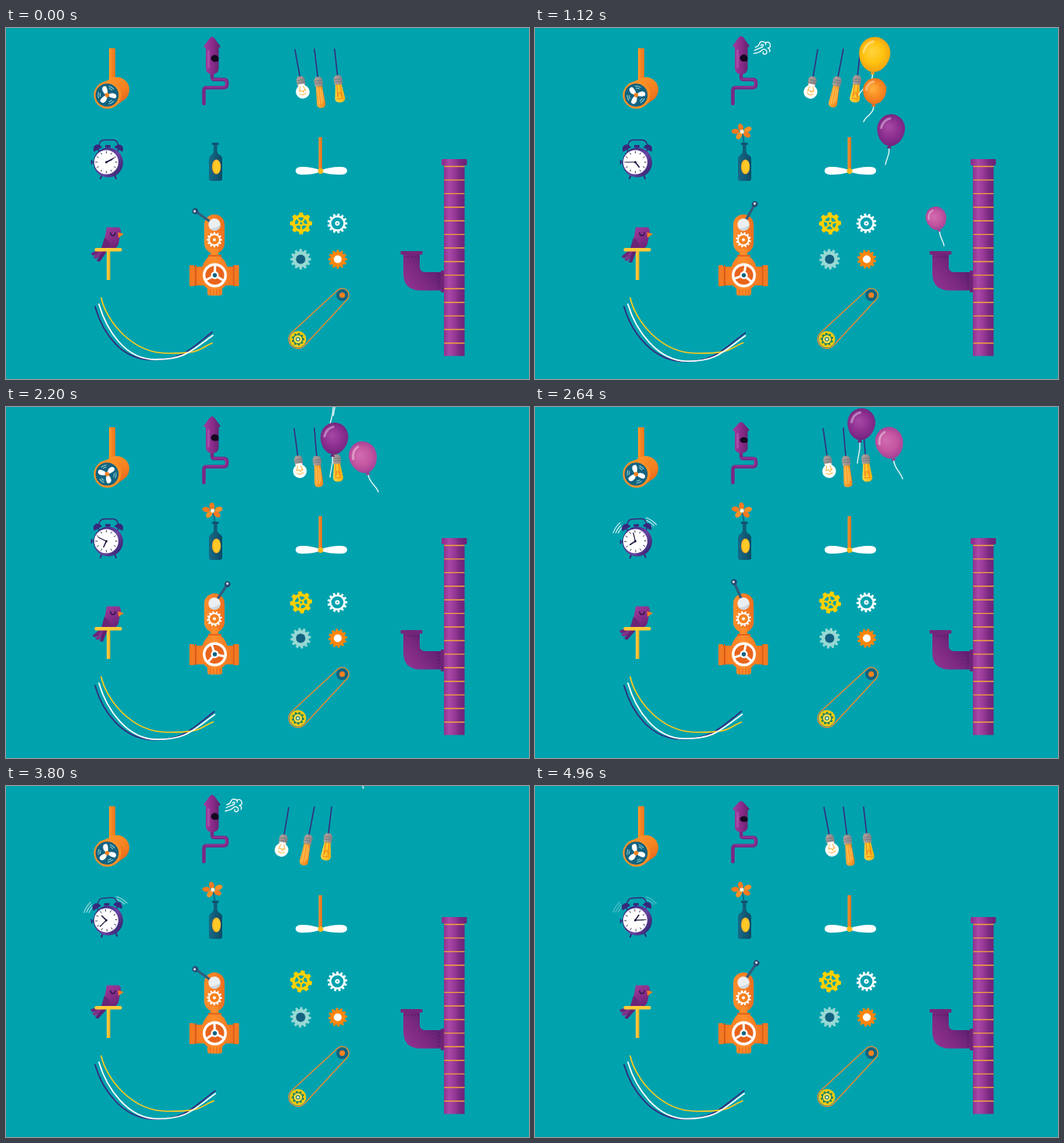
Animation, 670 px wide and 450 px high, one loop 5000 ms. Source, as an HTML page with a canvas:

```html
<!DOCTYPE html>
<html lang="en">
<head>
<meta charset="utf-8">
<title>Little machines</title>
<style>
html, body { margin: 0; width: 100%; height: 100%; overflow: hidden; background: #00a2ae; }
canvas { display: block; }
</style>
</head>
<body>
<canvas id="stage" width="670" height="450"></canvas>
<script>
const ctx = document.getElementById('stage').getContext('2d');
const LOOP = 5000, TAU = Math.PI * 2, DEG = Math.PI / 180;
const C = {
  bg: '#00a2ae', orange: '#f58220', deep: '#e8641b', yellow: '#ffcb0b', navy: '#37297c',
  purple: '#8b2c8c', teal: '#126381', pale: '#97d8d3', ink: '#20163f', white: '#fff'
};

// Drawing helpers
function fill(color, build) {
  ctx.beginPath(); build(); ctx.fillStyle = color; ctx.fill();
}
function stroke(color, width, build) {
  ctx.beginPath(); build();
  ctx.strokeStyle = color; ctx.lineWidth = width;
  ctx.lineCap = ctx.lineJoin = 'round'; ctx.stroke();
}
const disc = (x, y, r, color) => fill(color, () => ctx.arc(x, y, r, 0, TAU));
const oval = (x, y, rx, ry, color, a = 0) => fill(color, () => ctx.ellipse(x, y, rx, ry, a, 0, TAU));
const box = (x, y, w, h, color, r = 0) => fill(color, () => ctx.roundRect(x, y, w, h, r));
const ring = (x, y, r, w, color) => stroke(color, w, () => ctx.arc(x, y, r, 0, TAU));
const poly = (color, ...p) => fill(color, () => p.forEach(q => ctx.lineTo(...q)));
const line = (color, w, ...p) => stroke(color, w, () => p.forEach(q => ctx.lineTo(...q)));
const shape = (color, d) => { ctx.fillStyle = color; ctx.fill(new Path2D(d)); };
function trace(color, w, d) {
  ctx.strokeStyle = color; ctx.lineWidth = w; ctx.lineCap = 'round'; ctx.lineJoin = 'round';
  ctx.stroke(new Path2D(d));
}
function shade(x0, y0, x1, y1, ...colors) {
  const g = ctx.createLinearGradient(x0, y0, x1, y1);
  colors.forEach((c, i) => g.addColorStop(i / (colors.length - 1), c));
  return g;
}
function at(x, y, angle, draw, sx = 1, sy = sx) {
  ctx.save(); ctx.translate(x, y); ctx.rotate(angle); ctx.scale(sx, sy); draw(); ctx.restore();
}

// Timing helpers
const clamp = v => Math.max(0, Math.min(1, v));
const smooth = v => v * v * (3 - 2 * v);
function keyed(t, keys, ease = smooth) {
  const i = keys.findIndex(k => k[0] > t);
  if (i < 0) return keys[keys.length - 1][1];
  if (i === 0) return keys[0][1];
  const [a, b] = [keys[i - 1], keys[i]];
  return a[1] + (b[1] - a[1]) * ease((t - a[0]) / (b[0] - a[0]));
}
// Hermite curve through timed points; n selects the component
function glide(t, keys, n) {
  let i = keys.findIndex(k => k[0] > t);
  if (i < 0) return keys[keys.length - 1][n];
  i = Math.max(1, i);
  const slope = j => {
    const a = keys[Math.max(0, j - 1)], b = keys[Math.min(keys.length - 1, j + 1)];
    return (b[n] - a[n]) / (b[0] - a[0]);
  };
  const a = keys[i - 1], b = keys[i], d = b[0] - a[0], u = (t - a[0]) / d, u2 = u * u, u3 = u2 * u;
  return (2 * u3 - 3 * u2 + 1) * a[n] + (u3 - 2 * u2 + u) * d * slope(i - 1)
    + (3 * u2 - 2 * u3) * b[n] + (u3 - u2) * d * slope(i);
}

function gear(x, y, r, teeth, angle, color) {
  at(x, y, angle, () => fill(color, () => {
    const step = TAU / teeth;
    for (let i = 0; i < teeth; i++) {
      [[-.32, .79], [-.2, 1], [.2, 1], [.32, .79]].forEach(([o, k]) => {
        const a = (i + o) * step;
        ctx.lineTo(Math.cos(a) * r * k, Math.sin(a) * r * k);
      });
    }
  }));
}
function spokes(x, y, r, count, angle, width, color) {
  for (let i = 0; i < count; i++) {
    const a = angle + i * TAU / count;
    line(color, width, [x, y], [x + Math.cos(a) * r, y + Math.sin(a) * r]);
  }
}

function fan(t) {
  box(132, 26, 8, 44, shade(132, 0, 140, 0, '#ff9a2a', C.orange, '#ee7820'));
  const body = shade(130, 64, 150, 100, '#ff9429', C.orange, C.deep);
  disc(142, 79, 16, body);
  poly(body, [124, 70], [137, 63.8], [155, 89], [139, 101]);
  disc(130, 86, 17.5, '#ff9127');
  disc(129.5, 86, 14.8, C.teal);
  at(129.5, 86, t / 1000 * 7.2 - .4, () => {
    for (let i = 0; i < 3; i++) {
      ctx.rotate(TAU / 3);
      shape(C.white, 'M-1 -1Q-5 -7 -2 -11Q0 -13 3 -11Q4 -6 1 -1Z');
      stroke(C.pale, 1, () => ctx.arc(0, 0, 11.5, -.95, -.35));
      stroke(C.pale, 1, () => ctx.arc(0, 0, 9, -.85, -.4));
    }
    disc(0, 0, 2.8, C.orange);
  });
}

function chimney(t) {
  const p = t % 2500;
  const drop = t < 300 ? 8 * smooth(t / 300)
    : keyed(p, [[0, 8], [770, 8], [880, -7], [1000, 0], [1120, -1], [1300, 0], [2150, 0], [2430, 8]]);
  trace('#7d2782', 4.5, 'M264 58V63Q264 66 267 66H279Q283 66 283 70V72Q283 76.5 279 76.5H257Q253.5 76.5 253.5 80V97');
  trace('#9c3a9a', 1.2, 'M264 65.5H279Q282 66 282 70V72Q282 75.5 278 75.5H256');
  at(264, 59, 0, () => {
    const g = shade(-9, 0, 9, 0, '#9c3b9b', C.purple, '#68246f');
    box(-8, -36, 16.5, 36, g, [0, 0, 7, 7]);
    box(-6, -31, 3, 24, '#a64da4', 1.5);
    poly(g, [-11, -35], [-3, -46], [0, -48], [3, -46], [11, -35], [8, -33], [-8, -33]);
    oval(3.5, -20, 5, 4.4, '#160920');
    box(3, -19, 5, 3, '#160920');
  }, 1, (48 - drop) / 48);

  const age = p - 760;
  if (age < 0 || age > 1300) return;
  const out = 1 - (1 - clamp(age / 320)) ** 3;
  ctx.globalAlpha = keyed(age, [[0, 1], [650, 1], [1010, .6], [1075, .33], [1300, 0]]);
  at(275 + 14 * out + age * .0037, 38 - 11 * out - age * .0037, 0, () => {
    trace(C.white, 1.3, 'M-10 7Q-3 6 0 3Q3 0 6 3Q8 7 4 8Q1 8 2 5M-9 3Q-5 1 -2 0M-8 -1Q-4 -2 -3 -5Q-2 -9 2 -8Q6 -7 5 -4M5 -7Q10 -9 11 -4Q12 -1 8 0Q12 2 10 5M-2 0Q2 -1 2 -4Q0 -5 -1 -3');
  }, .12 + .88 * out);
  ctx.globalAlpha = 1;
}

function bulbs(t) {
  const p = (t / 2500 + .03) * TAU;
  const swing = 2 * ((1 + Math.cos(p)) / 2) ** 2 - 1;
  const hang = (x, y, angle, from, to, draw) => at(x, y, angle, () => {
    line(C.navy, 1.5, [0, from], [0, to]);
    at(0, to, 0, () => {
      poly(shade(-5, 0, 5, 0, '#b6a49c', '#8d8487'), [-3, -1], [3, -1], [5.5, 3], [5, 11], [-5, 11], [-5.5, 3]);
      line('#6b7b82', .9, [-5, 4], [5, 4]);
      line('#6b7b82', .9, [-5, 7], [5, 7]);
      draw();
    });
  });
  hang(366, 5, -.178 * swing - .01, 23, 59, () => {
    disc(0, 19, 8.8, C.white);
    box(-4, 9, 8, 5, C.white);
    trace('#f4b73f', 1, 'M-2 12L-4 18L-1 17L1 20L2 17L4 18L2 12M-4 21Q0 25 4 21');
  });
  hang(395, 27, -.16 * swing + .03, 0, 37, () => {
    shape(shade(-5, 0, 5, 0, '#ffad39', '#f2841f'), 'M-4 11H4L5.5 33Q6 39 0 39Q-6 39 -5.5 33Z');
    trace('#ffc95a', 1, 'M-2 13L-2 34M1 13L1 34M3 16L3 31');
  });
  hang(419, 10, -.115 * swing, 17, 52, () => {
    shape(shade(-6, 0, 6, 0, '#ffd640', '#f8b312'), 'M-4 11H4L6.5 29Q6 34 0 34Q-6 34 -6.5 29Z');
    trace(C.orange, 1, 'M-2 11L-3 27L-1 21L1 21L3 27L2 11M-4 29H4');
  });
}

function clock(t) {
  const bursts = [[640, 1060], [1240, 1620], [2450, 2800], [3460, 3860], [4900, 5250]];
  const burst = bursts.find(b => t > b[0] && t < b[1]);
  let tilt = t > 2800 && t < 3460 ? 12 * Math.sin((t - 2800) / 660 * Math.PI) : 0;
  if (burst) tilt = -4 * Math.abs(Math.sin((t - burst[0]) / 75));
  at(131, 173, tilt * DEG, () => {
    if (burst) {
      ctx.globalAlpha = clamp((t - burst[0]) / 150) * clamp((burst[1] - t) / 80);
      [[27, .16], [30, .2], [33, .24]].forEach(([r, w]) => {
        stroke('#d9f5f5', 1.1, () => ctx.arc(0, 0, r, 3.78 - w, 3.78 + w));
        stroke('#d9f5f5', 1.1, () => ctx.arc(0, 0, r, 5.35 - w, 5.35 + w));
      });
      ctx.globalAlpha = 1;
    }
    line(C.navy, 2, [-8, 15], [-10, 20]);
    line(C.navy, 2, [8, 15], [10, 20]);
    trace(C.navy, 1.4, 'M-12 -22Q-11 -29.5 -5 -29.5H6Q12 -29.5 13 -22');
    box(-4, -23, 7, 3.2, C.navy, 1);
    line(C.navy, 1.6, [-.5, -20], [-.5, -18]);
    [[-14, -19, -.5], [14, -19, .5]].forEach(([x, y, a]) => at(x, y, a, () =>
      shape(C.navy, 'M-6 2Q-5 -4.5 0 -4.5Q5 -4.5 6 2ZM-.8 2H.8V6H-.8Z')));
    line(C.navy, 1.4, [-18, -1], [-21, -1]);
    line(C.navy, 1.8, [-21.3, -3], [-21.3, 1]);
    disc(0, -.5, 19, shade(-12, -10, 18, 12, '#3d2b82', '#6a45a3', '#33236d'));
    disc(-2.5, -1, 15.5, C.white);
    for (let i = 0; i < 12; i++) {
      const a = i * TAU / 12, r = 11.5;
      line(C.ink, .8, [-2.5 + Math.cos(a) * r, -1 + Math.sin(a) * r],
        [-2.5 + Math.cos(a) * 13.8, -1 + Math.sin(a) * 13.8]);
    }
    const hour = keyed(t, [[0, 2.17], [1120, 4.75], [1760, 5.67], [2640, 7.97], [3280, 9.87], [4320, 11.4], [4960, 13.25], [5000, 13.36]], v => v);
    const hand = (turn, len, w) => {
      const a = turn * TAU - Math.PI / 2;
      line(C.ink, w, [-2.5, -1], [-2.5 + Math.cos(a) * len, -1 + Math.sin(a) * len]);
    };
    hand(hour / 12, 8, 1.6);
    hand(hour % 1, 11, 1.2);
    disc(-2.5, -1, 1.5, C.ink);
  });
}

function vase(t) {
  const grow = smooth(clamp((t - 150) / 400));
  if (grow > 0) at(268, 149, Math.sin(t / 400) * .03, () => {
    trace('#126381', 1.5, 'M0 0Q-1 -8 -3 -15');
    at(-3, -16, Math.sin(t / 310) * .15, () => {
      for (let i = 0; i < 5; i++) {
        const a = i * TAU / 5 - 1.72, x = Math.cos(a) * 8.5, y = Math.sin(a) * 5.6;
        oval(x, y, 5, 3.3, i % 2 ? '#ff9127' : '#f47b20', Math.atan2(y, x));
      }
      disc(0, 0, 2.6, '#fff1dc');
    });
  }, grow);
  const glass = shade(260, 0, 277, 0, '#176b88', '#125b78', '#0d4c66');
  box(266, 148, 4.5, 14, glass);
  box(264, 147, 8.5, 3, '#0f526e', 1);
  shape(glass, 'M266 159H270.5Q271.5 162 275 163.5Q277 165 277 169V193Q277 196 274 196H263Q260 196 260 193V169Q260 165 262 163.5Q265 162 266 159Z');
  oval(269.5, 178, 5.7, 9.5, '#e99a25');
  oval(269.8, 178, 4.9, 8.7, '#ffc928');
}

function propeller() {
  box(400.5, 140, 4.5, 41, shade(400, 0, 405, 0, '#f99435', '#dd731f'));
  shape(C.white, 'M403 182.5Q391 177.5 378 178Q371 178.5 371 183Q371 187.5 378 188Q391 188.5 403 184.5Q416 188.5 430 188Q437 187.5 437 183Q437 178.5 430 178Q416 177.5 403 182.5Z');
  disc(403, 183.5, 3.4, '#f8b91a');
}

function bird(t) {
  const wag = t < 60 ? -.3 : Math.cos(t / 1080 * TAU);
  box(129, 285, 4.5, 38, shade(129, 0, 133, 0, '#ffd24a', '#f6b221'));
  at(127, 283, -wag * 11 * DEG, () => {
    shape('#6d2579', 'M-4 -1L-18 7L-15 10L-2 4Z');
    shape('#82308a', 'M-3 0L-15 12L-11 14L0 5Z');
    shape('#5f2272', 'M-2 1L-10 16L-6 17L2 4Z');
  });
  shape(shade(128, 258, 144, 282, '#9a3a98', '#842d88', '#652273'), 'M129 255.5H145Q149 260 146 267L144 277Q142 283 136 283H122Q125 276 127 267Z');
  shape('#6b2577', 'M126 269Q133 273 135 281L122 283Z');
  poly(C.orange, [143.5, 262], [151, 264], [144, 269]);
  trace(C.ink, 1.3, 'M134 262.5Q134 266 137 266Q140 266 140 262.5');
  box(113.5, 282, 35, 4.5, '#ffc938', 2);
}

function valve(t) {
  const angle = keyed(t, [[0, -55], [700, -55], [1160, 31], [1300, 34], [2400, 34], [2800, -55], [4200, -55], [4640, 34]]) * DEG;
  const g = shade(235, 0, 298, 0, '#f1701e', '#ff8e2b', '#ed6d1e');
  box(254, 239, 26, 50, shade(254, 0, 280, 0, '#ff8f2c', '#ee701f'), 13);
  shape(g, 'M262 283H272V290L279 297Q285 305 285 317Q285 329 277 334V340Q277 343 273 343H262Q258 343 258 340V334Q250 329 250 317Q250 305 256 297L262 290Z');
  box(238, 306, 58, 24, g);
  [[235, 6], [242, 2], [291, 2], [292.5, 6]].forEach(([x, w]) => box(x, 304, w, 27, w > 2 ? '#f37a23' : '#d85b1a', 1));
  for (let x = 262; x < 275; x += 4) line('#d85b1a', .8, [x, 335], [x, 342]);
  box(259, 291, 17, 2, '#e2651d');
  at(267, 252, angle, () => {
    line('#315c7c', 3.2, [0, 0], [0, -28]);
    disc(0, -30, 3.8, '#284b73');
    disc(-.5, -30.5, 1.5, '#dfeaf0');
  });
  disc(267, 252, 7.7, '#eceff1');
  shape('#cdd7dd', 'M261 257A7.7 7.7 0 0 0 274.7 252Q270 257 261 257Z');
  gear(267, 271.5, 9.8, 12, t / 900, C.white);
  disc(267, 271.5, 6, C.orange);
  disc(267, 271.5, 2, C.white);
  disc(267.5, 317, 14, C.deep);
  ring(267.5, 317, 13.7, 3.4, C.white);
  spokes(267.5, 317, 13, 3, .55 + .5 * Math.sin(t / 2500 * TAU), 3, C.white);
  disc(267.5, 317, 5, C.white);
  disc(267.5, 317, 2.7, C.teal);
}

function gears(t) {
  const turn = t / 1500;
  gear(378, 250.5, 14.3, 8, turn, '#ffd000');
  disc(378, 250.5, 7.8, C.bg);
  spokes(378, 250.5, 8, 5, turn + .3, 2.4, '#ffd000');
  disc(378, 250.5, 3.8, '#ffd000');
  disc(378, 250.5, 1.4, C.bg);
  gear(424.5, 250.5, 12.8, 13, -turn, C.white);
  disc(424.5, 250.5, 7.8, C.bg);
  disc(424.5, 250.5, 3, C.white);
  disc(424.5, 250.5, 1, C.bg);
  gear(377.5, 296.5, 13.2, 12, -turn * .8, C.pale);
  disc(377.5, 296.5, 6, C.teal);
  gear(425, 296.5, 12.2, 12, turn, '#ff850d');
  disc(425, 296.5, 5, C.white);

  disc(430.7, 342.5, 7.6, C.teal);
  disc(430.7, 342.5, 3.6, C.orange);
  disc(374, 399, 10.5, C.yellow);
  gear(374, 399, 8.2, 9, turn * 1.5, '#25835c');
  disc(374, 399, 5.2, '#ffe04a');
  disc(374, 399, 2.8, '#238166');
  disc(374, 399, 1.5, C.white);
  trace('#f58a2b', 1.3, 'M365.7 390.8L424.6 336.5A8.5 8.5 0 0 1 436.9 348.3L382.3 407.3A11.7 11.7 0 0 1 365.7 390.8Z');
}

function wires(t) {
  const k = (1 - Math.cos(t / 2900 * TAU)) / 2;
  const low = 425.5 + 2.5 * k, mid = 187 + 5 * k;
  trace(C.navy, 1.7, `M114 357C124 392 ${mid - 39} ${low} ${mid} ${low}S${235 + 5 * k} 413 ${264 + 6 * k} ${390 + k}`);
  trace('#ffca1c', 1.7, `M122 346C128 374 160 417 207 417S${244 + 2 * k} 412 ${264 + 3 * k} ${404 - k * .5}`);
  trace(C.white, 1.8, `M119 354C129 388 ${mid - 34} ${low - .5} ${mid + 4} ${low - .5}S${236 + 5 * k} 415 ${265 + 5 * k} ${394 + k * .5}`);
}

function tower() {
  const tube = shade(561, 0, 588, 0, '#8f318f', '#a948a7', '#973997', '#7a2a80', '#6e2478');
  box(561, 172, 26.5, 248.5, tube);
  for (let i = 0; i < 14; i++) line('#f2a23c', 1.4, [562, 177.5 + i * 17.42], [587, 177.5 + i * 17.42]);
  box(558, 168, 32.5, 8, tube, 1.5);
  shape(shade(510, 325, 540, 300, '#8f318f', '#7d2a81', '#642073'), 'M509 289H530V306Q530 313 537 313H561V336.5H531Q509 336.5 509 314Z');
  box(505.5, 286, 28, 4.5, '#75267a', 1);
  box(557, 311, 4, 28, '#702476', 1);
  for (let i = 0; i < 5; i++) {
    disc(511 + i * 4.3, 293.5, .8, '#4e1a58');
    disc(554.5, 316 + i * 4.3, .8, '#4e1a58');
  }
}

// Each balloon: launch time, radii, colors, then [time, x, y, tilt, string end dx, dy]
const balloons = [
  { start: 130, rx: 20, ry: 22.5, colors: ['#ffd23a', '#ffc20e', '#f19a16'],
    path: [[1120, 435, 34, 6, -20, 52], [1760, 426, -2, 3, -6, 52], [2600, 422, -80, 0, -4, 52]] },
  { start: 400, rx: 15, ry: 16.8, colors: ['#ffac3c', '#f78a21', '#e96f1c'],
    path: [[1120, 435, 81, 4, -14, 39], [1760, 422, 37, 2, -6, 45], [2560, 418, -72, 0, -4, 45]] },
  { start: 680, rx: 17.8, ry: 20.5, colors: ['#a345a1', '#8d2f90', '#6c2379'],
    path: [[1120, 456, 131, 6, -7, 44], [1760, 427, 63, 6, -6, 48], [2640, 418, 22, 5, -5, 50], [3280, 416, -17, 3, -4, 48], [3900, 414, -70, 0, -4, 48]] },
  { start: 950, rx: 17.8, ry: 20.5, colors: ['#d069ae', '#c455a0', '#9b3d95'],
    path: [[1120, 514, 244, -14, 10, 35], [1760, 467, 98, -18, 20, 42], [2640, 454, 46, -14, 17, 46], [3280, 448, 4, -12, 14, 48], [3900, 443, -55, -10, 14, 48]] }
].map(b => {
  const launch = [[b.start, 519, 288, 0, 2, 30], [b.start + 170, 514, 244, -14, 10, 35], [b.start + 440, 460, 135, 0, 0, 44]];
  return { ...b, path: [...launch.filter(k => k[0] < b.path[0][0] - 20), ...b.path] };
});

function balloon(b, t) {
  const path = b.path;
  if (t < b.start || t > path[path.length - 1][0]) return;
  const [x, y, tilt, ex, ey] = [1, 2, 3, 4, 5].map(n => glide(t, path, n));
  const size = keyed(t - b.start, [[0, .3], [170, .74], [440, 1]], v => v);
  const a = tilt * DEG, low = (b.ry + 2) * size;
  const kx = x - Math.sin(a) * low, ky = y + Math.cos(a) * low;
  const tx = x + ex, ty = y + ey;
  stroke('#e6f6f4', 1.4, () => {
    ctx.moveTo(kx, ky);
    ctx.bezierCurveTo(kx + 1, ky + (ty - ky) * .5, tx + (kx - tx) * .25, ty - (ty - ky) * .4, tx, ty);
  });
  at(x, y, a, () => {
    const { rx, ry, colors } = b;
    poly(colors[2], [-1, ry - 1], [1, ry - 1], [3, ry + 3], [-3, ry + 3]);
    const g = ctx.createRadialGradient(-rx * .2, -ry * .2, 2, 0, 0, ry * 1.1);
    colors.forEach((c, i) => g.addColorStop(i / 2, c));
    shape(g, `M0 ${ry}C${-rx * .6} ${ry} ${-rx} ${ry * .4} ${-rx} ${-ry * .1}A${rx} ${ry * .9} 0 0 1 ${rx} ${-ry * .1}C${rx} ${ry * .4} ${rx * .6} ${ry} 0 ${ry}Z`);
    stroke('rgba(255,255,255,.38)', 3, () => ctx.ellipse(0, 0, rx * .72, ry * .74, 0, 3.25, 4.5));
  }, size);
}

function render(t) {
  ctx.fillStyle = C.bg;
  ctx.fillRect(0, 0, 670, 450);
  [fan, chimney, bulbs, clock, vase, propeller, bird, valve, gears, wires].forEach(draw => draw(t));
  balloons.forEach(b => balloon(b, t));
  tower();
}

const begin = performance.now();
function tick() {
  const t = (performance.now() - begin) % LOOP;
  render(Math.floor(t / 40) * 40);
  requestAnimationFrame(tick);
}
tick();
</script>
</body>
</html>
```
